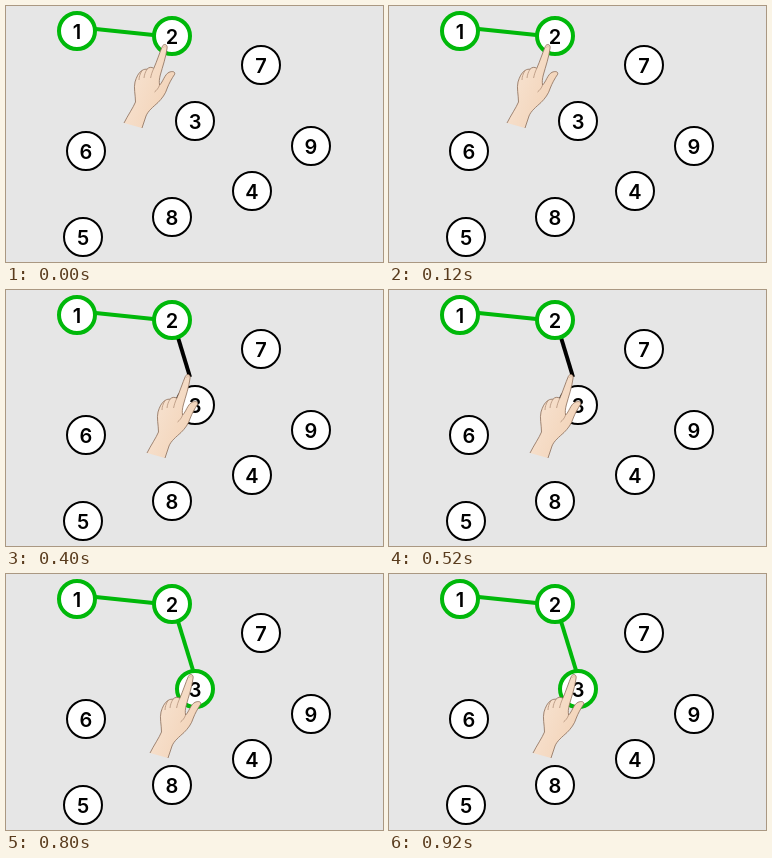
An HTML page with a canvas that plays this animation: 377x256 px, repeating every 1000 ms.

```html
<!DOCTYPE html>
<html lang="en">
<head>
<meta charset="utf-8">
<title>Connect the numbers</title>
<style>
html, body { margin: 0; width: 100%; height: 100%; overflow: hidden; background: #e6e6e6; }
canvas { display: block; width: 377px; height: 256px; }
</style>
</head>
<body>
<canvas id="stage" width="377" height="256"></canvas>
<script>
const ctx = document.getElementById('stage').getContext('2d');
const GREEN = '#00b80a';
const INK = '#000';
const STEP = 200;

const nodes = [
  [71, 25], [166, 30], [189, 115], [246, 185], [77, 231],
  [80, 145], [255, 59], [166, 211], [305, 140]
];

// Hand offset and end of the line being drawn, one pose per step
const poses = [
  { hand: [0, 0] },
  { hand: [22, 26], end: [181, 68] },
  { hand: [23, 46], end: [184, 87] },
  { hand: [26, 62], end: [190, 106] },
  { hand: [26, 62], end: [190, 106], linked: true }
];

const outline = new Path2D(
  'M118 117 C122 109 127 102 129.5 96 C129.5 89 127.5 82 129 76 ' +
  'C130.5 71 132.5 66.5 136 64.5 C138 63 140 63.2 141 63.2 ' +
  'C143 61 145.5 60.8 147.8 62.3 C151 55 153.5 47 156.3 40.5 ' +
  'C157.3 37.6 161.3 37.8 161.2 41.5 C160 51 156.5 61 154.3 69 ' +
  'C153.3 73 153 76 153.6 79 C157 76 158.5 68.5 163 66.3 ' +
  'C166 65 169.3 65.3 168.7 68.2 C165.5 73 163 77.5 161.3 82 ' +
  'C159.5 88 156 92.5 152 96.5 C147 101 142 105 140 110 L136 122');

const creases = new Path2D(
  'M147.8 62.3 C146 66 145.2 69 144.6 72 M141 63.2 C139.3 66 138.3 69 138 72 ' +
  'M136 64.5 C134 68 133 71 133 74 M153.6 79 C152.6 82 150.5 84.5 148.5 86');

const nail = new Path2D('M157.5 42 C158 39.2 160.3 39 160.2 42');

function drawLine(x1, y1, x2, y2, color) {
  ctx.strokeStyle = color;
  ctx.lineWidth = 4;
  ctx.beginPath();
  ctx.moveTo(x1, y1);
  ctx.lineTo(x2, y2);
  ctx.stroke();
}

function drawNode([x, y], label, active) {
  const border = active ? 4 : 2;
  ctx.beginPath();
  ctx.arc(x, y, 20 - border / 2, 0, Math.PI * 2);
  ctx.fillStyle = '#fff';
  ctx.fill();
  ctx.strokeStyle = active ? GREEN : INK;
  ctx.lineWidth = border;
  ctx.stroke();
  ctx.fillStyle = INK;
  ctx.fillText(label, x, y + (label < 3 ? 8 : 7.5));
}

function drawHand([dx, dy]) {
  ctx.save();
  ctx.translate(dx, dy);
  const skin = ctx.createLinearGradient(130, 80, 160, 92);
  skin.addColorStop(0, '#f6dfcb');
  skin.addColorStop(1, '#f3d5bb');
  ctx.fillStyle = skin;
  ctx.fill(outline);
  ctx.lineJoin = 'round';
  ctx.strokeStyle = '#8b6c58';
  ctx.lineWidth = 0.8;
  ctx.stroke(outline);
  ctx.strokeStyle = '#a98770';
  ctx.lineWidth = 0.7;
  ctx.stroke(creases);
  ctx.strokeStyle = '#c9a58e';
  ctx.lineWidth = 0.5;
  ctx.stroke(nail);
  ctx.restore();
}

function draw(time) {
  const pose = poses[Math.floor(time / STEP) % poses.length];
  ctx.fillStyle = '#e6e6e6';
  ctx.fillRect(0, 0, 377, 256);
  ctx.font = '600 20px Inter, sans-serif';
  ctx.textAlign = 'center';

  drawLine(80, 22, 157, 30, GREEN);
  if (pose.end) drawLine(167, 31, ...pose.end, pose.linked ? GREEN : INK);
  nodes.forEach((node, i) => drawNode(node, i + 1, i < 2 || (i === 2 && pose.linked)));
  drawHand(pose.hand);
}

const start = performance.now();
function tick() {
  draw(performance.now() - start);
  requestAnimationFrame(tick);
}
tick();
</script>
</body>
</html>
```
